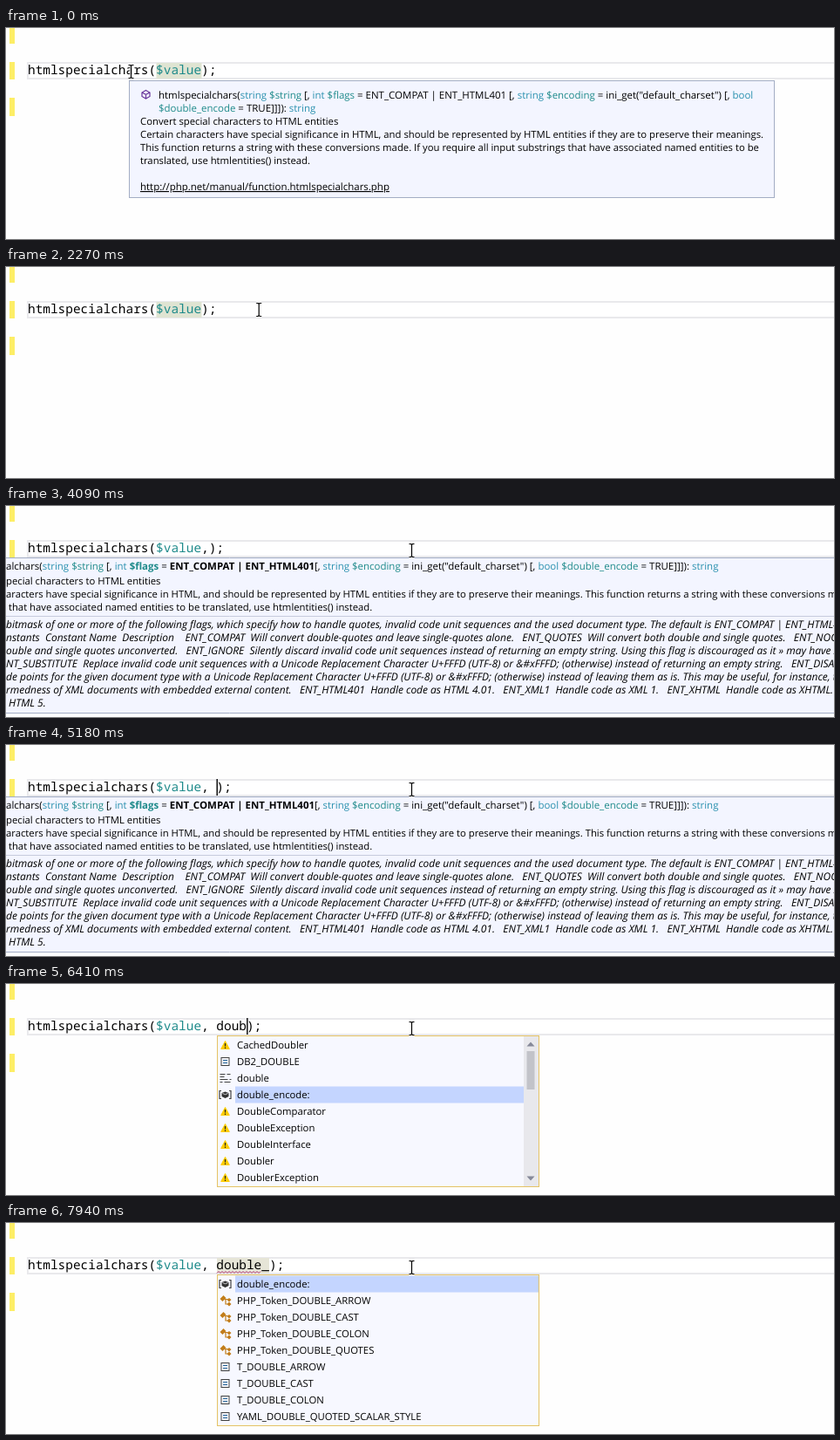
Write an HTML page that moves like this. It is 950 px wide and 242 px high and loops after 8 s.

```html
<!DOCTYPE html>
<html lang="en">
<head>
<meta charset="utf-8">
<title>Code completion</title>
<style>
html, body { margin: 0; width: 100%; height: 100%; overflow: hidden; background: #fefefe; }
svg { display: block; width: 950px; height: 242px; }
text { white-space: pre; text-rendering: geometricPrecision; fill: #000; }
.code { font: 14.43px "Noto Sans Mono", "DejaVu Sans Mono", monospace; }
.ui { font: 11.3px "Open Sans", "Noto Sans", sans-serif; }
.sign { font: 11.48px "Open Sans", "Noto Sans", sans-serif; }
.note { font: italic 12px "Open Sans", "Noto Sans", sans-serif; }
.type { fill: #2b91af; }
.var { fill: #1e8a8a; }
.bold { font-weight: 700; }
</style>
</head>
<body>
<svg id="stage" viewBox="0 0 950 242" xmlns="http://www.w3.org/2000/svg"></svg>
<script>
const LOOP = 8000;
const CODE_X = 25, CHAR_W = 8.66;
const stage = document.getElementById('stage');

const rect = (x, y, w, h, fill, extra = '') =>
  `<rect x="${x}" y="${y}" width="${w}" height="${h}" fill="${fill}" ${extra}/>`;
const line = (d, color, width = 1) =>
  `<path d="${d}" fill="none" stroke="${color}" stroke-width="${width}"/>`;
const text = (x, y, body, cls = 'ui') => `<text x="${x}" y="${y}" class="${cls}">${body}</text>`;
const span = (cls, body) => `<tspan class="${cls}">${body}</tspan>`;
const group = (id, body) => `<g id="${id}">${body}</g>`;
const lines = (x, y, rows, cls) => rows.map((row, i) => text(x, y + 15 * i, row, cls)).join('');
const columnX = n => CODE_X + CHAR_W * n;

const type = name => span('type', name);
const variable = name => span('var', name);
const encoding = `[, ${type('string')} ${variable('$encoding')} = ini_get("default_charset") [, ${type('bool')}`;
const lastParam = `${variable('$double_encode')} = TRUE]]]): ${type('string')}`;

function quickInfo() {
  const cube = 'M160.5 71.5L165 74V78.5L160.5 81L156 78.5V74ZM156 74L160.5 76.3L165 74M160.5 76.3V81';
  return rect(141.5, 60.5, 740, 134, '#f3f5ff', 'stroke="#a3adc4"') +
    line(cube, '#68349b', 1.2) +
    text(175, 81, `htmlspecialchars(${type('string')} ${variable('$string')} [, ${type('int')} ` +
      `${variable('$flags')} = ENT_COMPAT | ENT_HTML401 ${encoding}`, 'sign') +
    text(175, 96, lastParam, 'sign') +
    lines(154, 111, [
      'Convert special characters to HTML entities',
      'Certain characters have special significance in HTML, and should be represented by HTML entities if they are to preserve their meanings.',
      'This function returns a string with these conversions made. If you require all input substrings that have associated named entities to be',
      'translated, use htmlentities() instead.'], 'ui') +
    `<g text-decoration="underline">${text(154, 186, 'http://php.net/manual/function.htmlspecialchars.php', 'sign')}</g>`;
}

function paramInfo() {
  return rect(0, 59, 950, 179, '#f3f5ff') +
    line('M0 59.5H950M0 237.5H950', '#a3adc4') +
    line('M0 126.5H950', '#c6cbdd') +
    text(0, 73, `alchars(${type('string')} ${variable('$string')} [, ${type('int')} ` +
      `${span('var bold', '$flags')} = ${span('bold', 'ENT_COMPAT | ENT_HTML401')}`, 'sign') +
    text(354, 73, `${encoding} ${lastParam}`, 'sign') +
    lines(0, 90, [
      'pecial characters to HTML entities',
      'aracters have special significance in HTML, and should be represented by HTML entities if they are to preserve their meanings. This function returns a string with these conversions made.',
      ' that have associated named entities to be translated, use htmlentities() instead.'], 'ui') +
    lines(0, 140, [
      'bitmask of one or more of the following flags, which specify how to handle quotes, invalid code unit sequences and the used document type. The default is ENT_COMPAT | ENT_HTML401',
      'nstants  Constant Name  Description    ENT_COMPAT  Will convert double-quotes and leave single-quotes alone.   ENT_QUOTES  Will convert both double and single quotes.   ENT_NOQUOTES',
      'ouble and single quotes unconverted.   ENT_IGNORE  Silently discard invalid code unit sequences instead of returning an empty string. Using this flag is discouraged as it » may have security',
      'NT_SUBSTITUTE  Replace invalid code unit sequences with a Unicode Replacement Character U+FFFD (UTF-8) or &amp;#xFFFD; (otherwise) instead of returning an empty string.   ENT_DISALLOWED',
      'de points for the given document type with a Unicode Replacement Character U+FFFD (UTF-8) or &amp;#xFFFD; (otherwise) instead of leaving them as is. This may be useful, for instance, to',
      'rmedness of XML documents with embedded external content.   ENT_HTML401  Handle code as HTML 4.01.   ENT_XML1  Handle code as XML 1.   ENT_XHTML  Handle code as XHTML.',
      ' HTML 5.'], 'note');
}

// Icons are drawn around their own centre.
const icons = {
  warn: '<path d="M0-4.5L4.8 4.5H-4.8Z" fill="#fc0" stroke="#fc0" stroke-linejoin="round"/>' +
    line('M0-2V1.5M0 2.5V4', '#222', 1.2),
  constant: rect(-4.5, -4.5, 9, 9, '#f6f6fa', 'stroke="#424242"') + line('M-2.5-1.5H2.5M-2.5 1.5H2.5', '#1c5d94'),
  keyword: line('M-6-4.5H0M2-4.5H6M-6-1.5H-1M-6 1.5H3M5 1.5H7M-6 4.5H-3M-1 4.5H6', '#424242'),
  param: line('M-4.5-4.5H-6.5V4.5H-4.5M4.5-4.5H6.5V4.5H4.5', '#424242', 1.2) +
    '<path d="M0-3.5L4-2V2L0 4L-4 2V-2Z" fill="#333"/>' + line('M-3-1.5L0-.3L3-1.5', '#f6f6fa', .8),
  type: '<path d="M-6-2L-2-6L1-3L-3 1ZM2-1L4.5-3L7-1L4.5 1.5ZM2 4L4.5 1.5L7 4L4.5 6.5Z" fill="#c27d1a"/>' +
    line('M-1-1.5H3M.5-1.5V4H3', '#c27d1a', 1.2)
};

const listItems = rows => rows.map(([icon, name], i) =>
  `<g transform="translate(251.5 ${70 + 19 * i})">${icons[icon]}</g>` + text(265, 74 + 19 * i, name)).join('');

const wideRows = [
  ['warn', 'CachedDoubler'], ['constant', 'DB2_DOUBLE'], ['keyword', 'double'],
  ['param', 'double_encode:'], ['warn', 'DoubleComparator'], ['warn', 'DoubleException'],
  ['warn', 'DoubleInterface'], ['warn', 'Doubler'], ['warn', 'DoublerException']
];
const narrowRows = [
  ['param', 'double_encode:'],
  ...['ARROW', 'CAST', 'COLON', 'QUOTES'].map(s => ['type', 'PHP_Token_DOUBLE_' + s]),
  ...['ARROW', 'CAST', 'COLON'].map(s => ['constant', 'T_DOUBLE_' + s]),
  ['constant', 'YAML_DOUBLE_QUOTED_SCALAR_STYLE']
];

function completion() {
  const scroll = rect(594, 60, 17, 172, '#e8e8ec') +
    '<path d="M597.5 71.5H606.5L602 66.5ZM597.5 220.5H606.5L602 225.5Z" fill="#868999"/>' +
    rect(597.5, 77, 9, 44, '#c2c3c9', 'id="thumb"');
  return rect(242.5, 59.5, 369, 173, '#f7f8ff', 'stroke="#e5c365"') +
    rect(263, 60, 331, 19, '#c4d5ff', 'id="choice"') +
    group('wide', scroll + listItems(wideRows)) + group('narrow', listItems(narrowRows));
}

function squiggle() {
  let d = 'M242 57.5';
  for (let x = 244, up = true; x <= 293; x += 2, up = !up) d += `L${x} ${up ? 55.5 : 57.5}`;
  return line(d, '#b0307a');
}

const beam = 'M-3-7.5H-1L0-6.5L1-7.5H3M0-7V7M-3 7.5H-1L0 6.5L1 7.5H3';

stage.innerHTML =
  rect(0, 0, 950, 242, '#fefefe') +
  [[0, 18], [39, 20], [80, 21]].map(([y, h]) => rect(4, y, 6, h, '#fdee66')).join('') +
  rect(25, 40, 960, 18, '#fff', 'stroke="#e9e9ec" stroke-width="2"') +
  rect(172.5, 40, 52, 18, '#dfe4d2', 'id="valueMark"') +
  rect(242, 40, 52, 18, '#e6e5d7', 'id="wordMark"') +
  text(CODE_X, 53, `htmlspecialchars(${variable('$value')}<tspan id="typed"></tspan>);`, 'code') +
  group('squiggle', squiggle()) +
  group('quickInfo', quickInfo()) +
  group('paramInfo', paramInfo()) +
  group('completion', completion()) +
  rect(0, 39, 1.4, 19, '#000', 'id="caret"') +
  group('pointer', line(beam, '#fff', 2.6) + line(beam, '#000', 1.2));

const el = {};
for (const node of stage.querySelectorAll('[id]')) el[node.id] = node;
const show = (id, on) => { el[id].style.display = on ? '' : 'none'; };

const typing = [[0, ''], [3580, ','], [4140, ', '], [6200, ', d'], [6280, ', do'], [6360, ', dou'],
  [6410, ', doub'], [6610, ', doubl'], [6740, ', double'], [7500, ', double_']];
const caretSpans = [[1740, 2250], [2780, 3300], [3580, 4090], [4140, 4650], [5180, 5670], [6200, 7220], [7500, 7940]];
const pointerPath = [[860, 143.5, 50], [1580, 416, 83], [1640, 416, 83], [1720, 220, 42], [1760, 230, 49],
  [2060, 230, 49], [2270, 289.5, 49], [2800, 465.5, 51]];

const within = (t, a, b) => t >= a && t < b;

function pointerAt(t) {
  const i = pointerPath.findIndex(p => p[0] > t);
  if (i === 0) return pointerPath[0].slice(1);
  if (i < 0) return pointerPath[pointerPath.length - 1].slice(1);
  const [t0, x0, y0] = pointerPath[i - 1], [t1, x1, y1] = pointerPath[i];
  const k = (t - t0) / (t1 - t0);
  const e = t1 === 2800 ? 1 - (1 - k) ** 2 : t1 === 1580 ? k * k * (3 - 2 * k) : k;
  return [x0 + (x1 - x0) * e, y0 + (y1 - y0) * e];
}

function render(t) {
  const typed = typing.filter(step => step[0] <= t).pop()[1];
  el.typed.textContent = typed;
  el.caret.setAttribute('x', columnX(23 + typed.length));
  show('caret', caretSpans.some(([a, b]) => within(t, a, b)));
  const [x, y] = pointerAt(t);
  el.pointer.setAttribute('transform', `translate(${x.toFixed(1)} ${y.toFixed(1)})`);

  show('valueMark', t < 3580);
  show('wordMark', within(t, 7070, 7500) || t >= 7810);
  el.wordMark.setAttribute('width', t < 7500 ? 52 : 60);
  show('squiggle', t >= 7070);

  show('quickInfo', t < 1200);
  el.quickInfo.setAttribute('opacity', Math.min(1, Math.max(0, (1200 - t) / 200)));
  show('paramInfo', within(t, 3630, 5410));

  const narrow = t >= 7500;
  show('completion', t >= 6320);
  show('wide', !narrow);
  show('narrow', narrow);
  const row = narrow ? 0 : t < 6740 ? 3 : 2;
  el.choice.setAttribute('y', 60.5 + 19 * row);
  el.choice.setAttribute('width', narrow ? 348 : 331);
  el.thumb.setAttribute('height', t < 6610 ? 44 : 50);
}

const start = performance.now();
function tick() {
  render((performance.now() - start) % LOOP);
  requestAnimationFrame(tick);
}
tick();
</script>
</body>
</html>
```
